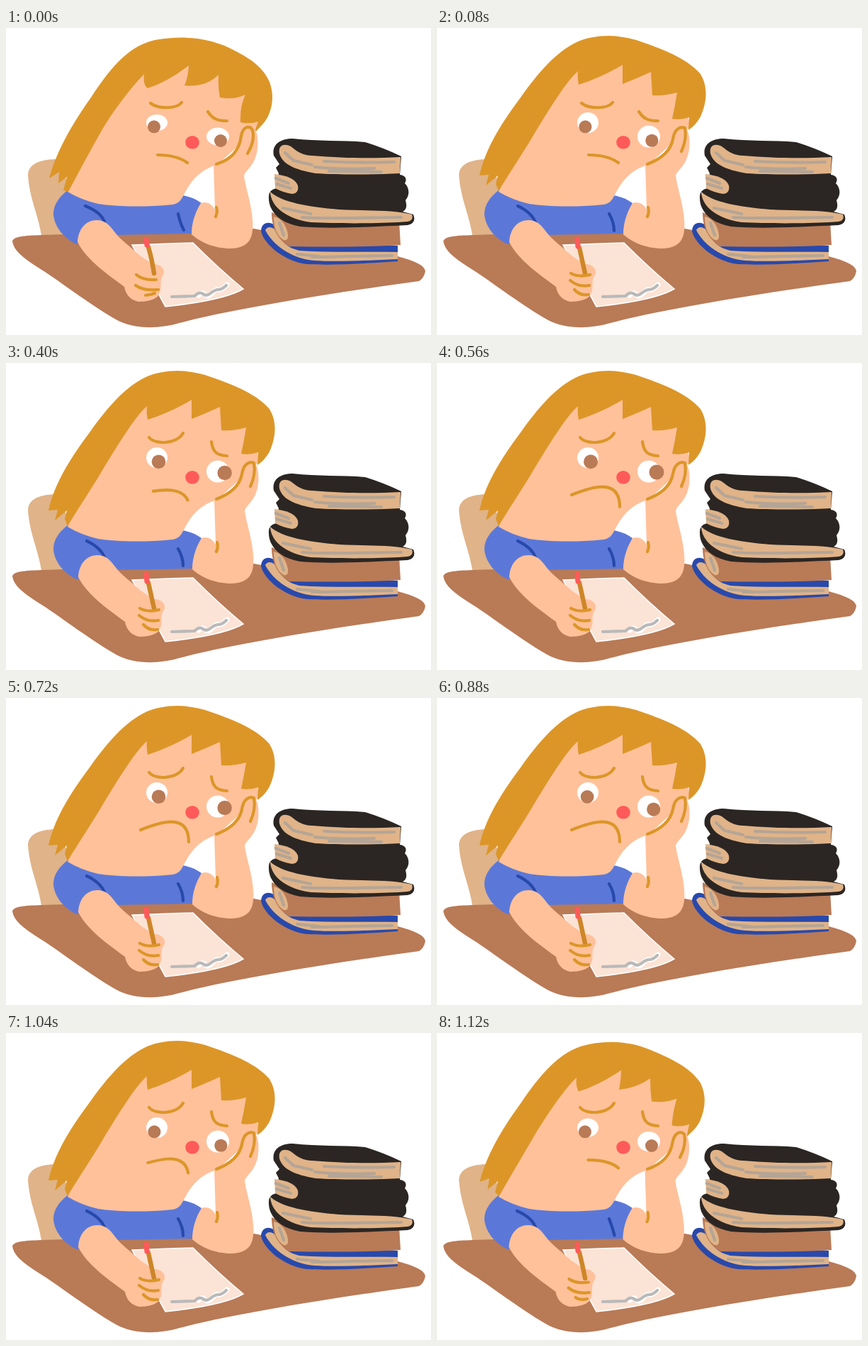
Write an HTML page that moves like this. It is 600 px wide and 433 px high and loops after 1200 ms.

```html
<!DOCTYPE html>
<html lang="en">
<head>
<meta charset="utf-8">
<title>Homework</title>
<style>
  html, body { margin: 0; width: 100%; height: 100%; overflow: hidden; background: #fff; }
  svg { display: block; width: 100vw; height: 100vh; }
  .skin { fill: #ffc19a; }
  .hair { fill: #dc9628; }
  .wood { fill: #b97a56; }
  .sand { fill: #e0b388; }
  .ink { fill: #2b2623; }
  .navy { fill: #2849ac; }
  .shirt { fill: #5b78d8; }
  .red { fill: #ff5a5a; }
  .white { fill: #fff; }
  .line { fill: none; stroke-width: 4.2; stroke-linecap: round; stroke-linejoin: round; }
  .gold { stroke: #dc9628; }
  .gray { stroke: #b4a596; }
  .fold { stroke: #2849ac; }
  .pencil { stroke: #cd8628; stroke-width: 6.4; }
  .tip { stroke: #ff5a5a; stroke-width: 7.2; }
</style>
</head>
<body>
<svg viewBox="0 0 600 433" preserveAspectRatio="none">
  <path class="sand" d="M31 207C32 192 46 186 70 185L100 240L100 293H50C46 265 33 240 31 207Z"/>
  <path class="wood" d="M9 301C10 294 25 293 50 292L350 283L553 322C575 328 591 334 592 343Q590 353 583 357C480 371 330 394 245 416C215 425 180 425 155 411C112 386 75 356 44 337C24 324 11 314 9 301Z"/>

  <g id="books">
    <path class="navy" d="M360 286C361 274 371 272 379 278L392 298L553 307V329C510 332 460 335 425 333C395 330 364 306 360 286Z"/>
    <path class="sand" d="M366 285C370 278 378 281 384 289C390 303 398 310 414 314C460 317 510 315 553 316V326C510 328 465 330 435 328C402 325 377 306 366 285Z"/>
    <path class="line gray" d="M411 319L442 322M432 323C470 323 510 321 545 321"/>
    <path class="wood" d="M375 260L400 270L555 272L557 306C510 309 450 309 400 308C386 300 375 285 375 260Z"/>
    <path class="sand" d="M378 266C389 268 396 279 398 291Q399 301 392 299C383 294 378 282 378 266Z"/>
    <path class="line gray" d="M386 275L392 292"/>
    <path class="ink" d="M378 180C375 165 386 156 405 156C440 160 475 158 507 161Q533 169 558 181L556 207C563 208 567 212 563 219C570 226 570 236 564 243C566 250 566 256 560 259L575 263Q580 275 567 278C520 280 460 284 415 280C386 275 371 258 371 240Q370 228 382 226L385 205L381 197L386 192Z"/>
    <path class="sand" d="M386 177C384 166 392 162 402 167C412 175 420 180 432 180C480 184 520 184 557 182L556 205C520 207 470 207 437 205C408 200 390 192 386 177Z"/>
    <path class="line gray" d="M394 176L406 187L432 193M449 188C485 190 515 190 548 189M436 196C465 199 495 199 520 198M456 202L530 203"/>
    <path class="sand" d="M379 206C395 208 408 212 412 222Q414 233 404 234Q391 232 380 226Z"/>
    <path class="line gray" d="M381 212L399 219M382 220L402 226"/>
    <path class="sand" d="M373 231C390 246 425 252 470 256C510 258 545 256 573 263Q576 271 567 273C530 276 470 276 430 274C395 269 374 252 373 231Z"/>
    <path class="line gray" d="M391 254L430 262M418 267C460 270 510 267 558 267"/>
  </g>

  <path class="shirt" d="M87 229C76 237 66 250 67 264C69 281 82 297 100 305L150 292L263 290L276 247C268 241 258 237 248 236L180 240Z"/>
  <path id="folds" class="line fold"/>
  <path d="M178 306Q225 304 264 303Q300 339 335 368Q308 384 225 393Z" fill="#fbe3d5" stroke="#fff" stroke-width="1.6"/>
  <g class="line">
    <path d="M272 377Q277 371 281 376T291 374T300 369T312 362" stroke="#fff" stroke-width="7"/>
    <path d="M234 379L266 378Q273 371 278 375T289 374T300 369T311 363" stroke="#b9b9b9"/>
  </g>

  <path class="skin" d="M87 231L120 165L185 62L260 42L300 46L350 90L357 140L298 193C276 199 262 213 250 237C247 243 243 248 235 249C195 253 155 252 130 248Q105 242 87 231Z"/>
  <path id="hair" class="hair"/>
  <g id="arm">
    <path class="skin" d="M276 247C285 244 291 248 296 256L294 191C318 184 329 172 332 156C334 145 342 138 350 139C359 148 357 172 354 180C350 195 340 200 337 208C339 225 347 245 349 270C351 296 345 310 318 311C295 311 275 302 263 291C263 275 268 260 276 247Z"/>
    <path class="line gold" d="M298 253Q300 260 297 266"/>
    <path id="fingers" class="line gold"/>
  </g>

  <g id="hand">
    <path class="skin" d="M102 302C103 283 114 271 129 271C141 271 147 278 153 286C163 300 178 309 190 321L208 333C220 332 228 342 222 350C217 357 222 368 217 375C215 383 200 386 188 386C178 384 170 377 168 365C148 350 115 328 102 302Z"/>
    <path id="pencil" class="line pencil"/>
    <path id="tip" class="line tip"/>
    <path id="knuckles" class="line gold"/>
  </g>

  <ellipse id="whiteL" class="white" cx="213" cy="133.5" rx="15"/>
  <ellipse id="whiteR" class="white" cx="299" cy="153" rx="16"/>
  <circle id="pupilL" class="wood"/>
  <circle id="pupilR" class="wood"/>
  <ellipse class="red" cx="263" cy="161.3" rx="9.8" ry="9.3"/>
  <path id="browL" class="line gold"/>
  <path id="browR" class="line gold"/>
  <path id="mouth" class="line gold"/>
</svg>
<script>
const STEP = 80, FRAMES = 15;
const $ = id => document.getElementById(id);

// Each part has two extreme drawings: head held up, head sunk down.
const posture = {
  hair: [
    'M60 208C68 172 88 138 118 98C145 60 168 35 195 21C222 8 260 8 290 20C325 32 355 45 372 65C384 85 380 107 372 125C366 136 360 140 355 144L356 126Q344 130 332 128Q336 110 339 91Q322 96 304 95Q303 78 302 62Q282 71 262 79Q262 66 262 52Q231 70 200 80Q198 70 199 61C185 72 160 112 138 148C118 182 100 208 87 230L83 220L86 208L69 222L73 207Z',
    'M61 212C70 178 90 140 120 98C150 52 175 25 210 17C250 10 290 13 325 33C350 46 364 58 372 76C378 92 377 108 371 122C367 132 362 136 350 149L356 132Q345 136 331 133Q330 110 338 94Q322 102 302 98Q299 84 300 66Q282 84 252 81Q257 70 258 53Q228 76 200 85Q193 80 195 65C178 82 150 118 132 150C115 180 102 205 88 231L81 229L86 210L74 219L75 203Z'
  ],
  folds: [
    'M114 251C125 256 135 264 139 274M243 262Q250 274 250 286',
    'M112 251C125 256 135 263 139 273M243 262Q246 276 251 285'
  ],
  fingers: [
    'M297 192C318 184 330 172 333 157C335 143 343 138 350 141Q353 157 345 174',
    'M298 192C321 185 331 170 333 152C336 138 345 137 349 144Q353 158 342 177'
  ],
  pencil: ['M201 310Q205 328 209 346', 'M202 309Q207 326 210 346'],
  tip: ['M198 298L199 308', 'M199 299L200 306'],
  knuckles: [
    'M189 346Q200 352 216 348M188 356Q200 366 215 363M194 369Q202 378 214 376',
    'M185 348Q194 356 213 355M184 363Q195 371 216 369M198 377Q204 377 211 374'
  ]
};

// Calm and gloomy versions of each feature.
const mouth = ['M214 179C229 179 245 182 256 190', 'M190 186C215 176 258 160 258 203'];
const browL = ['M204 106C214 114 240 115 248 105', 'M202 105C211 116 241 114 250 99'];
const browR = ['M285 118C292 129 300 131 312 131', 'M290 111C292 127 299 130 312 131'];

// Mix two path strings that share the same commands.
function blend([a, b], u) {
  const ends = b.match(/\d+/g);
  let i = 0;
  return a.replace(/\d+/g, v => +v + (ends[i++] - v) * u);
}

function ease(from, to, x) {
  const u = Math.min(1, Math.max(0, (x - from) / (to - from)));
  return u * u * (3 - 2 * u);
}

function set(id, attrs) {
  for (const name in attrs) $(id).setAttribute(name, attrs[name]);
}

function draw(frame) {
  // The line boil repeats every four drawings: down, up, halfway, up.
  const sag = frame % 2 ? 0 : 1 - frame % 4 / 4;
  const gaze = (1 - Math.cos(frame / 7 * Math.PI)) / 2;
  const gloom = ease(4, 7, frame) - ease(12, 14.2, frame);
  const worry = ease(3, 5, frame);

  for (const id in posture) set(id, { d: blend(posture[id], sag) });
  for (const id of ['arm', 'hand']) set(id, { transform: `translate(${-sag} 0)` });
  set('whiteL', { ry: 14.5 - 3 * sag });
  set('whiteR', { ry: 15.5 - 3 * sag });
  set('pupilL', { cx: 209 + 8 * gaze, cy: 139.3, r: 9 + gaze });
  set('pupilR', { cx: 303 + 7 * gaze, cy: 159 - 5 * gaze, r: 9 + 1.5 * gaze });
  set('mouth', { d: blend(mouth, gloom) });
  set('browL', { d: blend(browL, worry) });
  set('browR', { d: blend(browR, worry) });
}

let start, shown = 0;
function tick(now) {
  start ??= now;
  const frame = Math.floor((now - start) / STEP) % FRAMES;
  if (frame !== shown) draw(shown = frame);
  requestAnimationFrame(tick);
}
draw(0);
requestAnimationFrame(tick);
</script>
</body>
</html>
```
